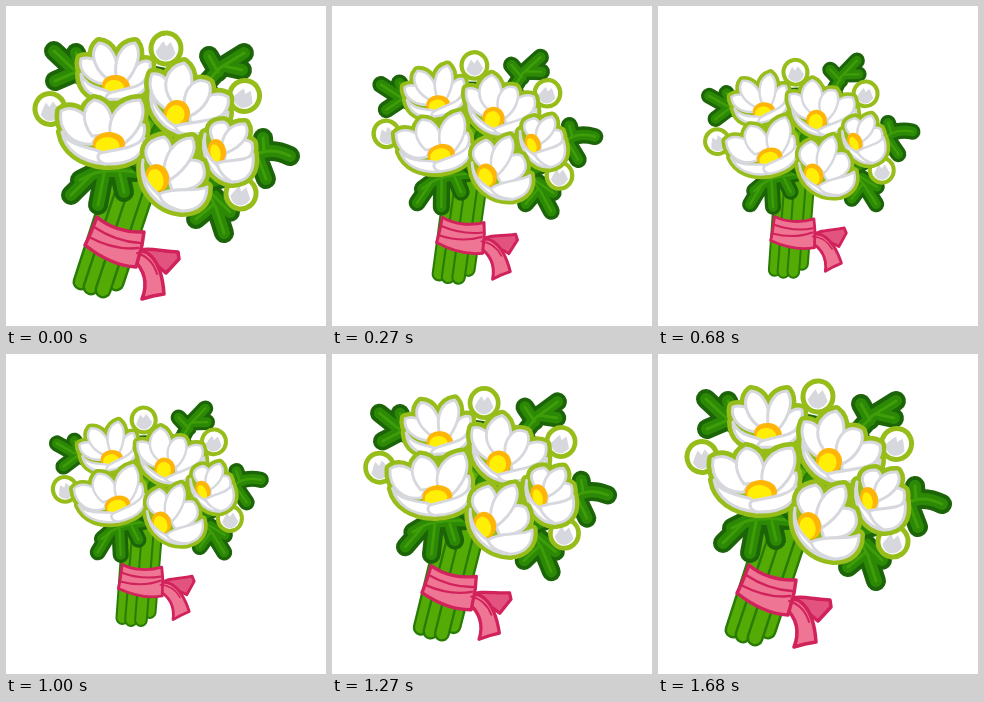
These frames come from a looping animation (320 px wide and 320 px high, 1990 ms). An HTML page:

```html
<!DOCTYPE html>
<html lang="en">
<head>
<meta charset="utf-8">
<title>Bouquet</title>
<style>
  html, body { margin: 0; width: 100%; height: 100%; overflow: hidden; background: #fff; }
  svg { display: block; width: 100%; height: 100%; }
  path, ellipse { stroke-linecap: round; stroke-linejoin: round; }
</style>
</head>
<body>
<svg viewBox="0 0 320 320"><g id="bouquet"></g></svg>
<script>
const LOOP = 1990;
const C = {
  edge: '#1c6408', leaf: '#2c8905', vein: '#3f9d08', stem: '#54ab06', stalk: '#287c06',
  lime: '#97bd1b', grey: '#d6d8de', yolk: '#ffee05', orange: '#ffb508',
  pink: '#ee7593', deep: '#d1225b', rose: '#e2547f'
};
const root = document.getElementById('bouquet');

const path = (d, fill, stroke, width) =>
  `<path d="${d}" fill="${fill}" stroke="${stroke}" stroke-width="${width}"/>`;
const line = (d, color, width) => path(d, 'none', color, width);
const oval = (x, y, rx, ry, turn, fill, stroke = 'none', width = 0) =>
  `<ellipse cx="${x}" cy="${y}" rx="${rx}" ry="${ry}" transform="rotate(${turn} ${x} ${y})" ` +
  `fill="${fill}" stroke="${stroke}" stroke-width="${width}"/>`;

const leaf = d => line(d, C.edge, 20) + line(d, C.leaf, 12) + line(d, C.vein, 3);
const stem = d => line(d, C.stalk, 17) + line(d, C.stem, 12);

function bud(x, y, turn) {
  return oval(x, y, 15, 15.5, turn, '#fff', C.lime, 5) +
    `<g transform="translate(${x} ${y}) rotate(${turn})">` +
    path('M-10 4C-8 1 -6 -4 -3 -7L0 -2L4 -7C6 -4 8 0 10 4C8 9 4 12 0 12C-5 12 -8 9 -10 4Z', C.grey, 'none', 0) +
    '</g>';
}

// back petals, then the heart, then front petals, over one shared rim
function flower(back, [x, y, rx, ry, turn], front, dx = 0) {
  const petal = d => path(d, '#fff', C.grey, 3);
  return `<g transform="translate(${dx} 0)">` +
    [...back, ...front].map(d => path(d, C.lime, C.lime, 12)).join('') +
    back.map(petal).join('') +
    oval(x, y, rx + 2, ry + 2, turn, C.orange) +
    oval(x - 1.5, y + 2, rx - 2, ry - 1, turn, C.yolk) +
    front.map(petal).join('') + '</g>';
}

const stems = [
  'M144 175L110 277', 'M108 174L75 276', 'M120 176L85 281', 'M132 178L97 284'
].map(stem).join('');

const leaves = [
  'M86 78L64 60L48 45M70 66L49 75M76 64L70 47',
  'M196 82L214 62L238 47M212 66L203 50M218 60L236 64',
  'M244 152C258 142 272 144 284 150M258 146L257 132M252 152L260 173',
  'M198 178L210 202L218 227M208 198L190 213M206 188L224 206',
  'M130 166C112 164 98 164 86 168L65 189M98 168L92 199M114 168L118 186M86 168L74 174'
].map(leaf).join('');

const ribbon =
  path('M130 246C140 240 156 246 172 246L173 253L160 267C152 259 142 253 130 253Z', C.rose, C.deep, 3.5) +
  path('M126 250C132 242 140 245 145 250C154 259 157 273 158 288L147 290L136 293C142 278 139 264 126 252Z', C.pink, C.deep, 3.5) +
  path('M91 211C102 221 120 227 138 226L136 239L130 261C112 260 94 251 79 239C84 230 87 221 91 211Z', C.pink, C.deep, 3.5) +
  line('M88 221C100 229 116 236 134 237M83 231C98 239 114 244 132 242', C.deep, 2.5) +
  line('M131 247C141 250 148 258 151 268', C.deep, 2);

const heads = [
  flower([
    'M98 78C82 76 72 64 75 53C86 49 98 58 103 72Z',
    'M100 72C86 60 84 44 93 37C106 38 112 54 112 70Z',
    'M120 76C124 62 136 52 144 56C146 68 138 80 122 84Z',
    'M110 70C108 54 114 38 129 37C136 46 132 62 120 76Z'
  ], [110, 80, 12, 9, 8], [
    'M75 68C80 80 92 82 101 85C107 88 108 92 104 93C86 92 75 84 75 68Z',
    'M104 87C118 82 132 83 142 73C141 87 128 95 101 93C99 92 100 89 104 87Z'
  ]),
  flower([
    'M164 104C148 96 143 80 148 68C160 66 170 80 172 98Z',
    'M168 96C156 80 162 61 180 57C191 65 190 84 180 98Z',
    'M186 108C194 92 212 83 224 91C227 106 212 120 186 116Z',
    'M180 98C180 82 192 69 205 77C210 88 200 104 186 110Z'
  ], [173, 107, 11, 11, 20], [
    'M147 86C149 100 158 108 165 116C172 121 177 124 180 128C160 125 144 106 147 86Z',
    'M171 120C188 115 208 117 224 106C224 121 204 129 180 128C176 127 172 124 171 120Z'
  ], -2),
  flower([
    'M208 136C200 122 206 116 218 116C226 120 224 132 216 138Z',
    'M220 146C228 134 240 131 246 137C249 150 240 160 218 156Z',
    'M216 138C218 124 228 117 239 118C245 127 238 140 220 147Z'
  ], [211, 145, 7, 10, -12], [
    'M199 128C197 140 202 151 208 156C214 163 222 171 226 176C206 174 193 148 199 128Z',
    'M211 157C224 153 239 156 247 148C249 165 242 176 226 176C218 172 212 164 211 157Z'
  ]),
  flower([
    'M86 138C66 140 52 124 55 105C66 98 82 106 92 128Z',
    'M86 130C74 114 77 100 88 94C102 96 108 110 106 128Z',
    'M116 138C122 124 131 117 138 119C141 132 130 144 116 146Z',
    'M104 128C102 112 112 94 134 94C140 104 138 122 118 138Z'
  ], [103, 138, 14, 10, 0], [
    'M56 126C62 138 78 141 90 144C99 147 102 153 99 158C75 156 59 144 56 126Z',
    'M94 147C110 143 128 143 138 132C140 147 127 159 99 158C92 156 90 150 94 147Z'
  ]),
  flower([
    'M148 160C136 146 142 134 160 131C170 138 168 152 160 164Z',
    'M164 172C172 156 188 150 198 157C205 172 196 186 168 184Z',
    'M160 162C162 144 174 132 188 132C195 144 184 162 166 174Z'
  ], [153, 172, 10, 12, -10], [
    'M139 154C137 170 145 180 153 187C162 195 170 201 178 205C154 203 134 182 139 154Z',
    'M155 188C172 180 190 187 203 181C203 196 194 205 178 205C166 202 157 196 155 188Z'
  ], -2)
].join('');

root.innerHTML = stems + ribbon + leaves +
  path('M88 72L150 62L206 74L232 130L218 180L190 188L132 166L84 120Z', C.leaf, C.edge, 4) +
  path('M128 92L150 118L130 150L150 160Z', C.stem, C.stalk, 3) +
  bud(44, 103, -10) + bud(160, 42.5, 5) + bud(238.5, 90, 20) + bud(235, 187.5, 10) + heads;

// cubic-bezier(.25, .1, .25, 1)
function ease(u) {
  if (u <= 0) return 0;
  if (u >= 1) return 1;
  const bez = (a, b, s) => 3 * a * s * (1 - s) ** 2 + 3 * b * s * s * (1 - s) + s ** 3;
  let lo = 0, hi = 1;
  for (let i = 0; i < 24; i++) {
    const mid = (lo + hi) / 2;
    if (bez(.25, .25, mid) < u) lo = mid; else hi = mid;
  }
  return bez(.1, 1, lo);
}

// the picture advances every 90 ms, restarting its beat each 500 ms
const beat = t => Math.floor(t / 500) * 500 + Math.floor(t % 500 / 90) * 90;

function draw(ms) {
  const t = beat(ms % LOOP);
  const p = ease(t / 610) - ease((t - 985) / 695);
  root.setAttribute('transform',
    `translate(${138.5 + 2.5 * p} ${147 + 4.5 * p}) rotate(${-14 * p}) ` +
    `scale(${1 - .2 * p}) translate(-138.5 -147)`);
}

const start = performance.now();
function tick() {
  draw(performance.now() - start);
  requestAnimationFrame(tick);
}
tick();
</script>
</body>
</html>
```
